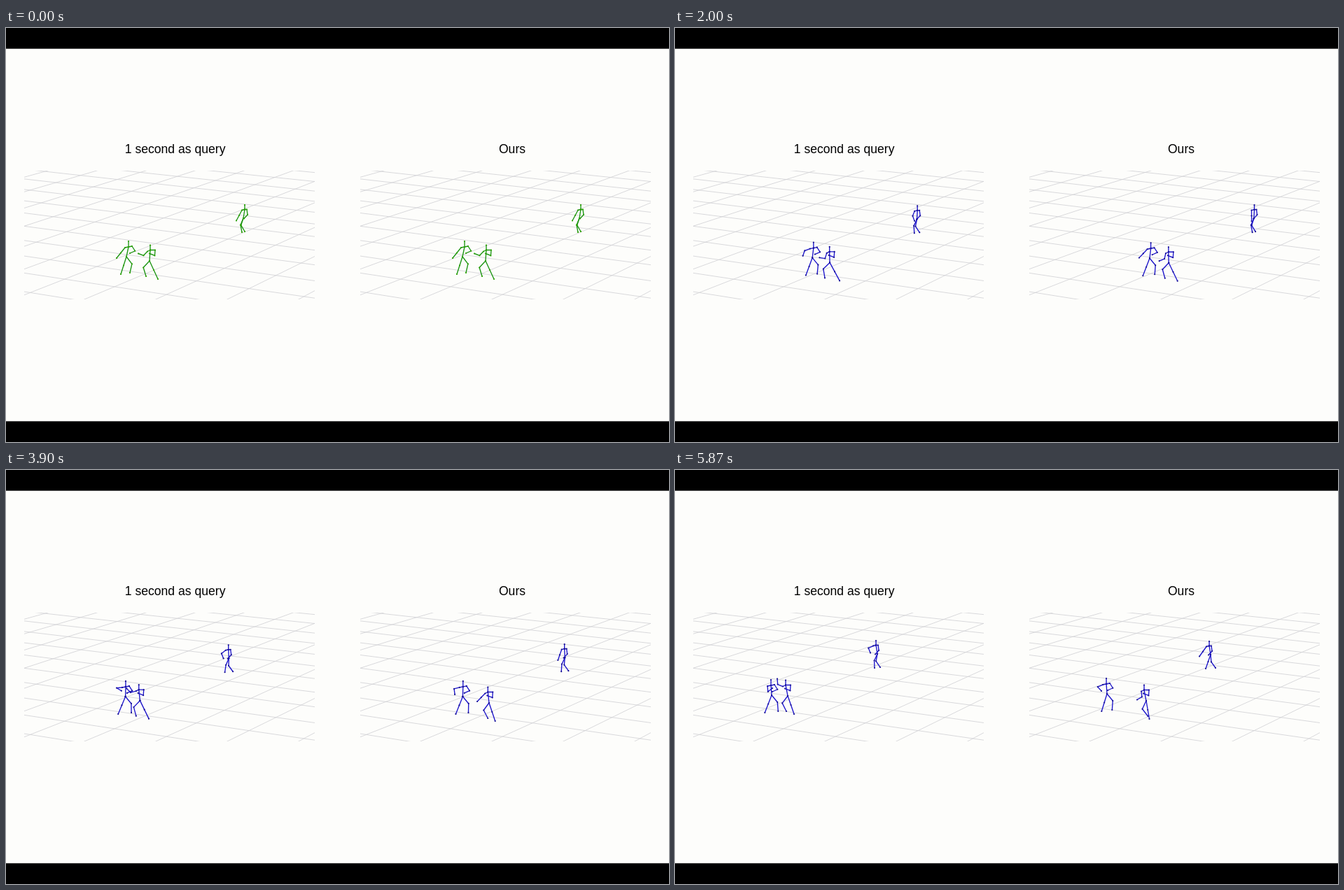
An HTML page with a canvas that plays this animation: 947 by 592 pixels, repeating every 5910 ms.

```html
<!DOCTYPE html>
<html lang="en">
<head>
<meta charset="utf-8">
<title>Motion forecast comparison</title>
<style>
html, body { margin: 0; width: 100%; height: 100%; overflow: hidden; background: #fdfdfb; }
canvas { display: block; }
</style>
</head>
<body>
<canvas id="stage" width="947" height="592"></canvas>
<script>
const ctx = document.getElementById('stage').getContext('2d');
const W = 947, H = 592, BAR = (H - W * 9 / 16) / 2;
const LOOP = 5910, FPS = 30, QUERY_END = 1000, HORIZON = -200;
const KEY_TIMES = [0, 1430, 2530, 5870];
const GREEN = ['#1b9412', '#2fa303'], BLUE = ['#1c14cc', '#1b1593'];

// Each key: hip x, hip y, lead hand from neck (x, y), distance between feet.
// The first two keys are common; each panel then takes its own last two.
const people = [
  {
    head: 8, neck: [3, -14], arm: 8, leg: 13, sway: 3,
    shoulders: [[-5, 1], [5, -1]], rearHand: [2, 9],
    feet: [[1.5, 25], [1.5, 23]], bends: [1, -1, 1, -1],
    start: [[172, 327, -17, 16, 13], [196, 331, -18, 15, 14]],
    ends: [[[191, 326, -12, 8, 18], [138, 322, 2, 4, 19]],
           [[194, 327, -15, 12, 19], [137, 320, -7, 10, 15]]]
  },
  {
    head: 7, neck: [1, -15.5], arm: 8, leg: 13, sway: 0,
    shoulders: [[-4, 2], [7, 0]], rearHand: [-1, 5],
    feet: [[3.5, 22], [3.5, 26]], bends: [-1, -1, 1, 1],
    start: [[205, 333, -17, 5, 17], [226, 336, -9, 12, 19]],
    ends: [[[212, 334, -19, 4, 22], [161, 323, -12, -9, 11]],
           [[221, 335, -17, 13, 16], [193, 330, -10, 14, 2]]]
  },
  {
    head: 6.5, neck: [2, -12.5], arm: 7.5, leg: 10.5, sway: 0,
    shoulders: [[-4, 1], [3, 0]], rearHand: [-1, 13],
    feet: [[0, 20], [0, 19]], bends: [1, -1, 1, 1],
    start: [[339, 272, -12, 16, 4], [350, 273, -3, 16, 2]],
    ends: [[[338, 273, -6, 14, 12], [289, 263, -8, 11, 8]],
           [[340, 271, -6, 17, 7], [285, 264, -14, 15, 14]]]
  }
];
const panels = [
  { x: 0, title: '1 second as query', titleX: 241.6 },
  { x: 480, title: 'Ours', titleX: 723 }
];

// Smooth interpolation through unevenly spaced keys
function interpolate(keys, time) {
  const last = keys.length - 1;
  let i = 0;
  while (i < last - 1 && time >= KEY_TIMES[i + 1]) i++;
  const span = KEY_TIMES[i + 1] - KEY_TIMES[i];
  const u = Math.min(1, (time - KEY_TIMES[i]) / span), v = 1 - u;
  const slope = (k, j) => {
    const a = Math.max(0, k - 1), b = Math.min(last, k + 1);
    return (keys[b][j] - keys[a][j]) / (KEY_TIMES[b] - KEY_TIMES[a]) * span;
  };
  return keys[i].map((p, j) =>
    p * (1 + 2 * u) * v * v + slope(i, j) * u * v * v +
    keys[i + 1][j] * u * u * (3 - 2 * u) - slope(i + 1, j) * u * u * v);
}

const add = ([ax, ay], [bx, by]) => [ax + bx, ay + by];

// Two equal bones: the middle joint bulges sideways when the limb is not stretched
function limb(from, to, bone, side) {
  const dx = to[0] - from[0], dy = to[1] - from[1], dist = Math.hypot(dx, dy) || 1;
  const bulge = side * Math.sqrt(Math.max(0, bone * bone - dist * dist / 4)) / dist;
  return [from, [from[0] + dx / 2 - dy * bulge, from[1] + dy / 2 + dx * bulge], to];
}

function skeleton(p, panel, time) {
  const [x, y, handX, handY, spread] = interpolate([...p.start, ...p.ends[panel]], time);
  const hip = [x, y];
  const neck = add(add(hip, p.neck), [-4 * time / LOOP, 0]);
  const sway = -p.sway * Math.cos(2 * Math.PI * time / 1860);
  const arms = [[handX, handY], p.rearHand].map((hand, i) =>
    [neck, ...limb(add(neck, p.shoulders[i]), add(neck, hand), p.arm, p.bends[i])]);
  const legs = p.feet.map((foot, i) =>
    limb(hip, add(add(hip, foot), [sway + (i - 0.5) * spread, 0]), p.leg, p.bends[i + 2]));
  return [[add(neck, [0, -p.head]), neck, hip], ...arms, ...legs];
}

function drawPerson(chains, [line, dot]) {
  ctx.strokeStyle = line;
  ctx.lineWidth = 1.35;
  ctx.lineJoin = ctx.lineCap = 'round';
  ctx.fillStyle = dot;
  for (const chain of chains) {
    ctx.beginPath();
    for (const joint of chain) ctx.lineTo(...joint);
    ctx.stroke();
    for (const joint of chain) {
      ctx.beginPath();
      ctx.arc(...joint, 1.1, 0, 7);
      ctx.fill();
    }
  }
}

// Parallel floor lines, evenly spaced on the lower edge, meeting on the horizon
function drawFan(vanishX, first, step, from, to) {
  ctx.beginPath();
  for (let k = from; k <= to; k++) {
    ctx.moveTo(vanishX, HORIZON);
    ctx.lineTo(2 * (first + k * step) - vanishX, 2 * 388 - HORIZON);
  }
  ctx.stroke();
}

function drawFloor() {
  ctx.save();
  ctx.beginPath();
  ctx.rect(26, 204, 415, 184);
  ctx.clip();
  ctx.strokeStyle = '#d0d0d3';
  ctx.lineWidth = 0.8;
  drawFan(-3600, 95, 179, 0, 14);
  drawFan(1512, 112, 102, -9, 3);
  ctx.restore();
}

function draw(now) {
  const step = Math.floor((now % LOOP + 9) * FPS / 1000);
  const time = step * 1000 / FPS;
  ctx.fillStyle = '#fdfdfb';
  ctx.fillRect(0, 0, W, H);
  ctx.fillStyle = '#000';
  ctx.fillRect(0, 0, W, BAR);
  ctx.fillRect(0, H - BAR, W, BAR);
  ctx.font = '17.6px "Liberation Sans", Arial, sans-serif';
  ctx.textAlign = 'center';
  panels.forEach((panel, i) => {
    ctx.fillStyle = '#000';
    ctx.fillText(panel.title, panel.titleX, 179);
    ctx.save();
    ctx.translate(panel.x, 0);
    drawFloor();
    for (const p of people)
      drawPerson(skeleton(p, i, time), time < QUERY_END - 1 ? GREEN : BLUE);
    ctx.restore();
  });
}

const began = performance.now();
function tick() {
  draw(performance.now() - began);
  requestAnimationFrame(tick);
}
tick();
</script>
</body>
</html>
```
